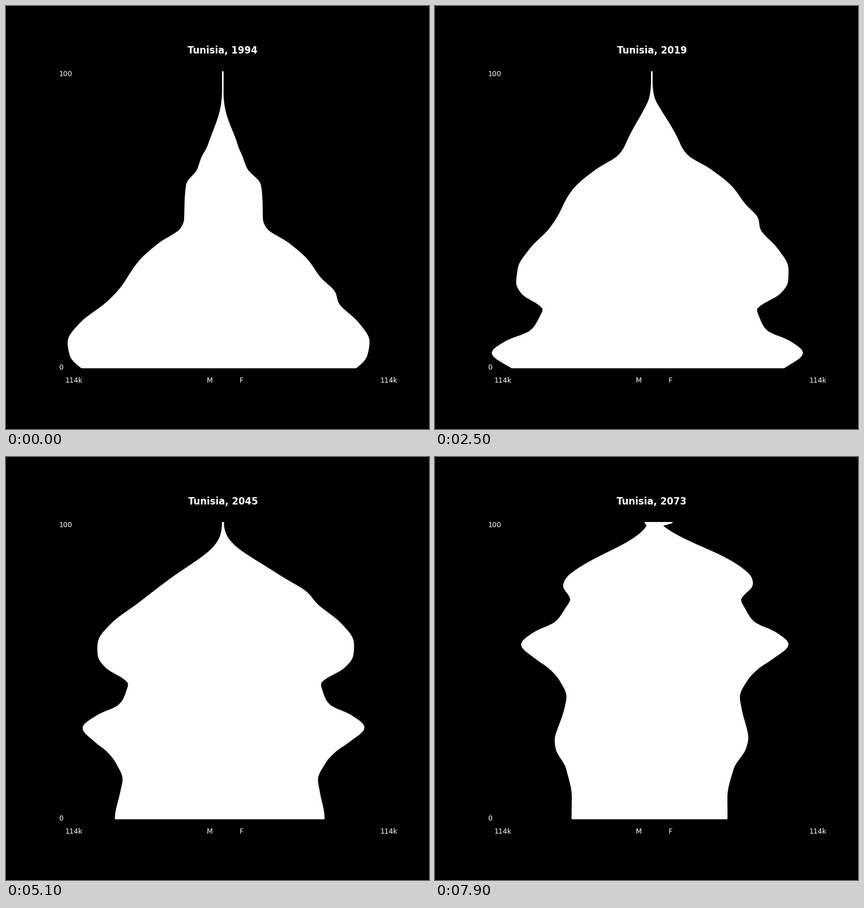
Recreate the animation shown at these times as a matplotlib script. Size 748 by 748 pixels, loop 8 s.

```python
import numpy as np
import matplotlib.pyplot as plt
from matplotlib.animation import FuncAnimation
from matplotlib.patches import Polygon

SIZE, DPI = 748, 100
START, FRAMES, STEP_MS = 1994, 80, 100
MID, BOTTOM, TOP = 383.35, 639.55, 115.95
YS = np.linspace(BOTTOM, TOP, 101)

# Turning points of the yearly births of boys, as widths in pixels
BIRTHS = [
    (1894, 55), (1919, 55), (1923, 63), (1927, 66), (1932, 86), (1944, 83),
    (1947, 90), (1952, 135), (1958, 174), (1962, 188), (1967, 200),
    (1972, 218), (1979, 257), (1985, 275), (1990, 270), (1994, 250),
    (1998, 208), (1999.5, 200), (2002, 203.5), (2005, 210), (2007, 220),
    (2010, 258), (2014, 283), (2019, 248), (2022, 220), (2026, 196),
    (2032, 178.6), (2036, 181.5), (2045, 190), (2049, 183), (2056, 155),
    (2066, 141), (2073, 141)]


def smooth(x, y, at):
    """Monotone cubic curve through the points."""
    h, s = np.diff(x), np.diff(y) / np.diff(x)
    a, b = s[:-1], s[1:]
    turn = a * b <= 0
    inner = np.where(turn, 0, 2 * a * b / np.where(turn, 1, a + b))
    m = np.concatenate([s[:1], inner, s[-1:]])
    i = np.clip(np.searchsorted(x, at, side="right") - 1, 0, len(h) - 1)
    u = (at - x[i]) / h[i]
    return ((1 + 2 * u) * (1 - u) ** 2 * y[i] + u * (1 - u) ** 2 * h[i] * m[i]
            + u * u * (3 - 2 * u) * y[i + 1]
            + u * u * (u - 1) * h[i] * m[i + 1])


def bump(x, center, width):
    return np.exp(-((x - center) / width) ** 2)


def boys(born):
    x, y = np.array(BIRTHS).T
    return smooth(x, y, np.clip(born, x[0], x[-1]))


def girls(born):
    ratio = 0.943 + 0.07 * bump(born, 1968, 3.5) - 0.1 * bump(born, 1924, 5)
    return boys(born) * ratio


def present(age, born, leave, life, gain):
    """Share of a cohort left after emigration and Gompertz mortality."""
    stay = 1 - leave / (1 + np.exp((25 - age) / 5))
    return stay * np.exp(-np.exp(0.105 * (age - life - gain * (born - 1944))))


def side(year, births, *rates):
    """Half widths for ages 0 to 99, then everyone older as one."""
    age = np.arange(116)
    born = year - age
    size = births(born) * present(age, born, *rates)
    return np.append(size[:100], size[100:].sum())


def outline(year):
    men = side(year, boys, 0.165, 83.7, 0.14)
    women = side(year, girls, 0.083, 85, 0.19)
    left = np.column_stack([MID - men, YS])
    right = np.column_stack([MID + women, YS])
    return np.concatenate([left, right[::-1]])


fig = plt.figure(figsize=(SIZE / DPI, SIZE / DPI), dpi=DPI, facecolor="black")
ax = fig.add_axes([0, 0, 1, 1])
ax.set_xlim(0, SIZE)
ax.set_ylim(SIZE, 0)
ax.axis("off")

shape = Polygon(outline(START), closed=True, color="#fefefe", lw=1.5,
                joinstyle="round")
ax.add_patch(shape)


def label(x, y, text, **style):
    return ax.text(x, y, text, color="white", family="DejaVu Sans",
                   **{"fontsize": 9, **style})


title = label(MID, 83.98, "", fontsize=12, weight="bold", ha="center")
label(93.5, 124.3, "100")
label(93.5, 642.7, "0")
for x, text in [(105.1, "114k"), (354.4, "M"), (412.3, "F"), (661.6, "114k")]:
    label(x, 665.7, text)


def update(i):
    year = START + i
    shape.set_xy(outline(year))
    title.set_text(f"Tunisia, {year}")
    return shape, title


anim = FuncAnimation(fig, update, frames=FRAMES, interval=STEP_MS,
                     repeat=True, repeat_delay=0)
plt.show()
```
